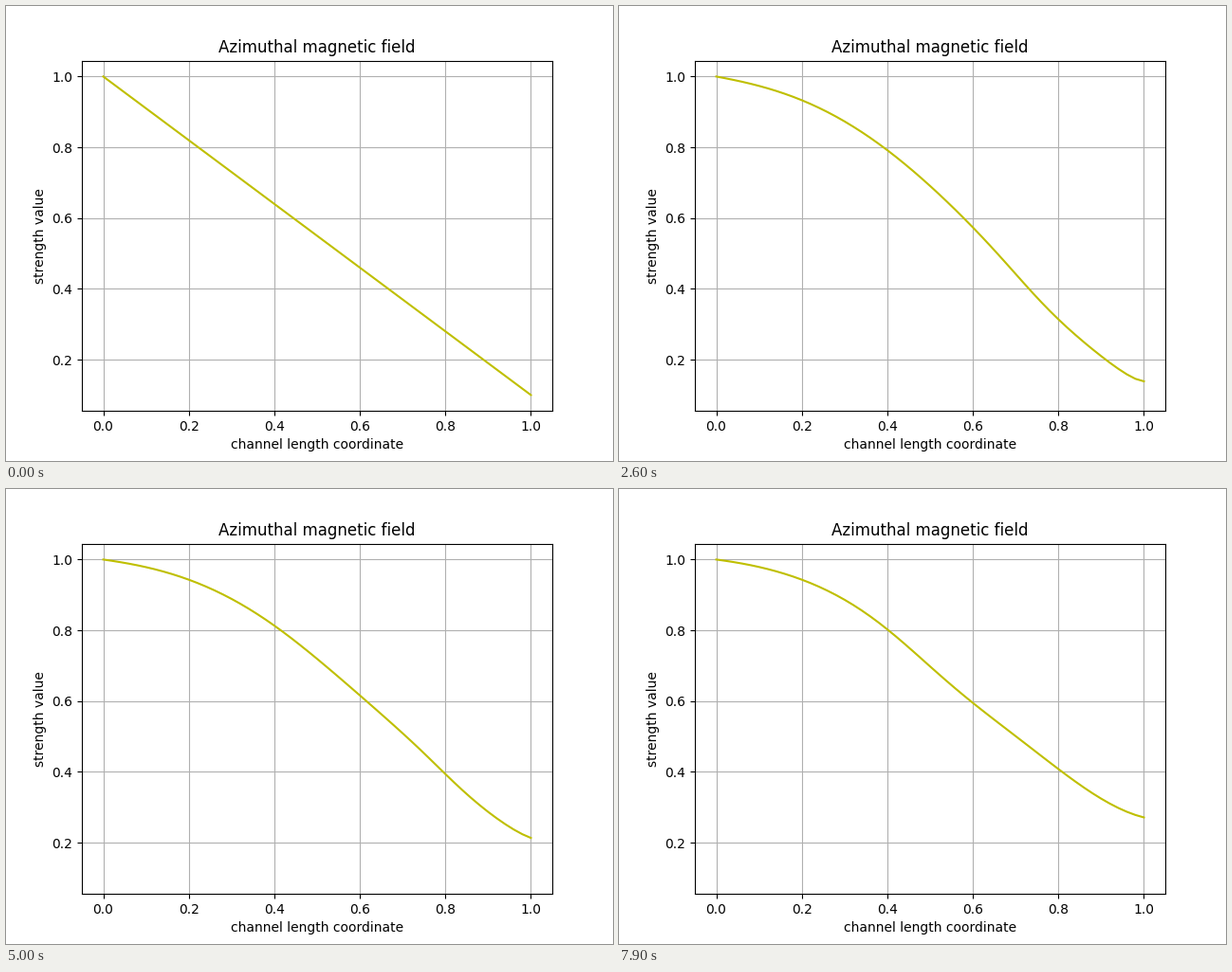
Animation, 640 px wide and 480 px high, one loop 8 s. Source, as a matplotlib script:

```python
import numpy as np
import matplotlib.pyplot as plt
from matplotlib.animation import FuncAnimation

FRAMES, INTERVAL = 80, 100
LOOP = FRAMES * INTERVAL / 1000

x = np.linspace(0, 1, 51)

# Each point of the channel rises from the linear profile to its own height,
# later and more abruptly the farther it lies from the inlet.
height = x * np.polyval(np.polyfit([0.1, 0.4, 0.7, 1], [0.69, 0.443, 0.208, 0.172], 3), x)
delay = 0.75 + 2.6 * x + 1.75 / (1 + np.exp((0.77 - x) / 0.06))
power = 0.7 + 2.8 * x

sag = 0.033 * np.exp(-((x - 0.55) / 0.17) ** 2)
outlet = 0.035 * np.exp((x - 1) / 0.03)


def field(t):
    """Field strength along the channel at t seconds."""
    rise = height * (1 - np.exp(-(t / delay) ** power))
    late = (t / LOOP) ** 3
    edge = (1 - np.exp(-t / 0.5)) * np.exp(-(t / 4) ** 2)
    return 1 - 0.9 * x + rise - sag * late + outlet * edge


fig, ax = plt.subplots(figsize=(6.4, 4.8), dpi=100)
line, = ax.plot(x, field(0), "y")
ax.set(xlim=(-0.05, 1.05), ylim=(0.055, 1.045),
       title="Azimuthal magnetic field",
       xlabel="channel length coordinate", ylabel="strength value")
ax.grid()


def update(k):
    line.set_ydata(field(k * INTERVAL / 1000))
    return line,


anim = FuncAnimation(fig, update, frames=FRAMES, interval=INTERVAL,
                     repeat=True, repeat_delay=0)
plt.show()
```
